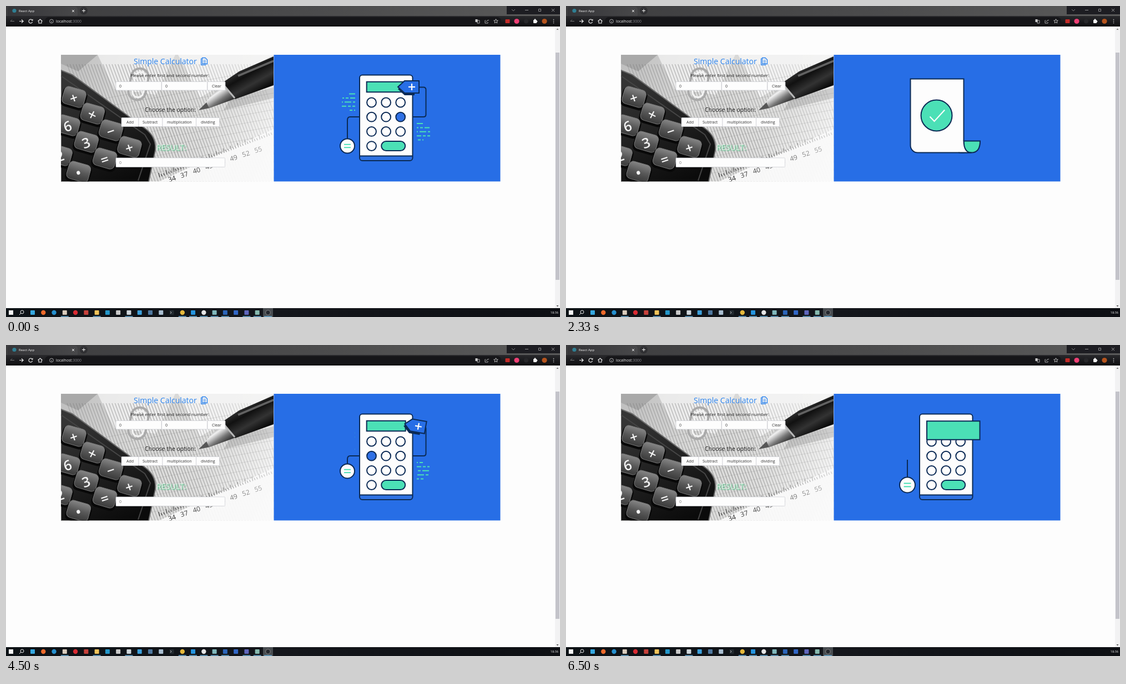
An HTML page with a canvas that plays this animation: 998 by 561 pixels, repeating every 6.57 s.

```html
<!DOCTYPE html>
<html lang="en">
<head>
<meta charset="utf-8">
<title>React App</title>
<style>
  html, body { margin: 0; width: 100%; height: 100%; overflow: hidden; background: #fdfdfd; }
  canvas { display: block; width: 998px; height: 561px; }
</style>
</head>
<body>
<canvas id="stage"></canvas>
<script>
const W = 998, H = 561, LOOP = 6570, CYCLE = 4970;
const NAVY = '#0b2a55', BLUE = '#276ee6', GREEN = '#4be0b6', WHITE = '#fdfdfd';
const dpr = window.devicePixelRatio || 1;
const stage = document.getElementById('stage');
const back = document.createElement('canvas');
for (const c of [stage, back]) { c.width = W * dpr; c.height = H * dpr; }
let g = back.getContext('2d');
g.scale(dpr, dpr);

// ---- helpers ----
function paint(fill, stroke, width = 2) {
  if (fill) { g.fillStyle = fill; g.fill(); }
  if (stroke) { g.strokeStyle = stroke; g.lineWidth = width; g.stroke(); }
}
function box(x, y, w, h, fill, stroke, r = 0, width = 2) {
  g.beginPath();
  g.roundRect(x, y, Math.max(0, w), Math.max(0, h), r);
  paint(fill, stroke, width);
}
function disc(x, y, r, fill, stroke, width) {
  if (r <= 0) return;
  g.beginPath();
  g.arc(x, y, r, 0, 7);
  paint(fill, stroke, width);
}
function poly(pts, fill, stroke, width, open) {
  g.beginPath();
  pts.forEach(([x, y], i) => i ? g.lineTo(x, y) : g.moveTo(x, y));
  if (!open) g.closePath();
  paint(fill, stroke, width);
}
const line = (pts, color, width) => poly(pts, null, color, width, true);
function text(s, x, y, size, color, weight = 400, align = 'left') {
  g.font = `${weight} ${size}px "Open Sans", "Noto Sans", sans-serif`;
  g.textAlign = align;
  g.textBaseline = 'alphabetic';
  g.fillStyle = color;
  g.fillText(s, x, y);
}
function at(x, y, angle, draw, scale = 1) {
  g.save();
  g.translate(x, y);
  g.rotate(angle);
  g.scale(scale, scale);
  draw();
  g.restore();
}
function ramp(x0, y0, x1, y1, ...colors) {
  const grad = g.createLinearGradient(x0, y0, x1, y1);
  colors.forEach((c, i) => grad.addColorStop(i / (colors.length - 1), c));
  return grad;
}

// ---- browser window ----
function drawBrowser() {
  box(0, 0, W, H, WHITE);
  box(0, 0, W, 18, ramp(0, 0, W, 0, '#3c3c3e', '#4a4a4b', '#5a5a5a'));
  box(3, 1, 126, 20, ramp(3, 0, 129, 0, '#353538', '#48484a'), null, 5);
  disc(15, 8.5, 3.6, '#2f7f93');
  text('React App', 23, 11, 6, '#f2f2f2', 500);
  line([[119, 7], [123, 11]], '#eee', 1);
  line([[123, 7], [119, 11]], '#eee', 1);
  disc(140, 8.5, 7, '#303033');
  line([[137, 8.5], [143, 8.5]], '#eee', 1);
  line([[140, 5.5], [140, 11.5]], '#eee', 1);
  box(902, 0, 96, 15, '#1d1d22');
  line([[911, 6], [914, 9], [917, 6]], '#999', 0.8);
  line([[935, 7.5], [941, 7.5]], '#aaa', 0.8);
  box(959.5, 5.5, 4, 4, null, '#aaa', 0, 0.8);
  line([[983, 5], [988, 10]], '#bbb', 0.8);
  line([[988, 5], [983, 10]], '#bbb', 0.8);

  box(0, 18, W, 19, ramp(0, 18, 0, 37, '#29292c', '#0d0d10'));
  box(70, 20, 822, 14, '#161619', null, 7);
  line([[15, 27.5], [8, 27.5], [11, 24.5]], '#777', 1);
  line([[24, 27.5], [31, 27.5], [28, 24.5]], '#eee', 1.1);
  line([[31, 27.5], [28, 30.5]], '#eee', 1.1);
  g.beginPath(); g.arc(44.5, 27.5, 3.4, 0.4, 5.6); paint(null, '#eee', 1.1);
  poly([[45.5, 26.5], [48.5, 26.5], [48.5, 23.5]], '#eee');
  line([[57.5, 27.5], [61.5, 24], [65.5, 27.5]], '#eee', 1.1);
  line([[59, 27], [59, 31], [64, 31], [64, 27]], '#eee', 1.1);
  disc(82, 27.5, 3.4, null, '#ccc', 0.8);
  line([[82, 27], [82, 29.5]], '#ccc', 0.8);
  text('localhost', 90, 30, 6.8, '#eee');
  const hostWidth = g.measureText('localhost').width;
  text(':3000', 90 + hostWidth, 30, 6.8, '#8c8c90');

  box(845.5, 24, 4, 5, '#ccc');
  box(849, 26, 4, 5, null, '#ccc', 0, 0.8);
  line([[864, 26], [863, 26], [863, 31], [868, 31], [868, 29]], '#ccc', 0.8);
  line([[865, 29], [867, 26], [870, 25.5]], '#ccc', 0.8);
  const star = [];
  for (let i = 0; i < 10; i++) {
    const a = -Math.PI / 2 + i * Math.PI / 5, r = i % 2 ? 1.8 : 4;
    star.push([882.5 + r * Math.cos(a), 27.5 + r * Math.sin(a)]);
  }
  poly(star, null, '#ddd', 0.8);
  box(899.5, 24, 8, 7, '#c22a28', null, 1);
  disc(920, 27.5, 4.6, '#ee3f74');
  disc(937, 27.5, 4, '#27272a');
  box(950, 25, 6, 6, '#f2f2f2', null, 1);
  disc(953, 24.7, 1.4, '#f2f2f2');
  disc(956, 28, 1.4, '#f2f2f2');
  disc(970, 27.5, 4.6, '#b5541d');
  for (const y of [24.5, 27.5, 30.5]) disc(986.5, y, 0.8, '#ddd');

  box(989, 37, 9, 508, '#f2f2f3');
  box(990, 84, 7, 410, '#c3c3ca');
  poly([[991.5, 43], [995.5, 43], [993.5, 40.5]], '#777');
  poly([[991.5, 540], [995.5, 540], [993.5, 542.5]], '#555');
}

function drawTaskbar() {
  box(0, 545, W, 16, ramp(0, 545, W, 545, '#0d1216', '#14161b', '#0d0f13'));
  box(463, 545, 18, 16, '#484c50');
  box(5, 549, 8, 8, '#f4f4f4');
  disc(29, 552, 3, null, '#eee', 1);
  line([[27, 554], [24, 557]], '#eee', 1);
  const icons = ['#35a7df', '#ed6a2b', '#2690cf', '#d8cbbc', '#d92b33', '#c6413b', '#f0c35a',
    '#2396c9', '#c8c8c8', '#ced5da', '#3c9fda', '#4f789f', '#a9bed0', '#232a30', '#e5b83b',
    '#2795df', '#e6e6e6', '#80b7bb', '#2c65b9', '#3267c5', '#6067bd', '#86b9ae', '#24272d'];
  icons.forEach((color, i) => {
    const x = 48 + i * 19.27;
    if ([1, 2, 4, 14, 16, 22].includes(i)) disc(x, 553, 4.2, color, i === 22 ? '#999' : null, 0.8);
    else box(x - 4, 549, 8, 8, color, null, 1);
    if ([3, 6, 9, 14, 15, 16, 17, 18, 20, 21, 22].includes(i)) box(x - 7, 559.4, 14, 1.4, '#6cb2dc');
  });
  line([[296, 551], [298, 553], [296, 555]], '#ddd', 0.8);
  text('18:36', 995, 555.2, 5.6, '#eee', 400, 'right');
}

// ---- desk picture behind the form ----
function drawDesk() {
  g.save();
  g.beginPath();
  g.rect(99, 88, 383.5, 228.5);
  g.clip();
  box(99, 88, 384, 229, ramp(99, 88, 482, 316, '#bdbdbd', '#d8d8d7', '#dededd', '#ffffff'));
  poly([[99, 88], [165, 88], [130, 118], [99, 104]], '#a9a9a9');
  poly([[165, 88], [305, 88], [270, 160], [195, 150]], 'rgba(245,245,245,.75)');
  poly([[310, 88], [482, 88], [410, 130], [350, 165]], 'rgba(250,250,250,.75)');

  for (let i = 0; i < 64; i++) {
    const x = 110 + i * 5.4;
    line([[x, 105], [x + 78, 317]], `rgba(70,70,70,${0.42 - Math.abs(i - 26) * 0.008})`, 1.2);
  }
  for (let i = 0; i < 11; i++)
    line([[160, 170 + i * 15], [482, 112 + i * 15]], 'rgba(105,105,105,.17)', 1);

  // scale sheet with its numbers
  poly([[275, 317], [372, 272], [482, 222], [482, 317]], 'rgba(250,250,250,.94)');
  for (let i = 0; i < 48; i++) {
    const x = 277 + i * 4.3, y = 309 - i * 1.63;
    line([[x, y], [x - 2, y - (i % 3 ? 4 : 8)]], `rgba(45,45,45,${0.8 - i * 0.013})`, 1.3);
  }
  for (let i = 0; i < 8; i++)
    at(299 + i * 22.2, 312 - i * 7.5, -0.3, () =>
      text(34 + i * 3, 0, 4, 12, `rgba(30,30,30,${0.95 - i * 0.075})`, 400, 'center'));

  // paper clip
  at(241, 142, 0.2, () => {
    box(-18, -29, 31, 57, null, '#aaa', 15, 4);
    box(-11, -23, 20, 46, null, '#f3f3f3', 10, 3);
  });

  // pen
  poly([[405, 166], [482, 147], [482, 166], [392, 188]], 'rgba(90,90,90,.22)');
  poly([[347, 188], [371, 161], [393, 137], [416, 166], [367, 184]],
    ramp(374, 145, 397, 178, '#444', '#f2f2f2', '#777', '#252525'));
  poly([[347, 188], [361, 174], [366, 184]], '#565656');
  poly([[389, 139], [420, 118], [482, 91], [482, 143], [413, 168]],
    ramp(420, 112, 447, 160, '#353535', '#111', '#333', '#090909'));
  line([[390, 140], [412, 166]], '#b9b9b9', 3);
  line([[418, 126], [482, 99]], '#626262', 4);

  // keypad
  g.beginPath();
  g.moveTo(99, 116);
  g.lineTo(119, 124);
  g.lineTo(252, 222);
  g.quadraticCurveTo(271, 237, 269, 260);
  g.lineTo(257, 317);
  g.lineTo(99, 317);
  g.closePath();
  paint(ramp(130, 130, 215, 316, '#353535', '#202020', '#0b0b0b'), '#696969', 2);
  line([[99, 126], [250, 232], [260, 249], [238, 315]], '#454545', 2);
  const rows = [[122, 166, ['+', '×', '−', '+']], [111, 217, ['6', '3', '=']], [97, 271, ['2', '•']]];
  for (const [x, y, keys] of rows) keys.forEach((key, i) =>
    at(x + i * 33.3, y + i * 30, 0.28, () => {
      box(-22, -17, 45, 36, '#080808', null, 9);
      box(-20, -18, 40, 32, ramp(0, -18, 0, 15, '#858585', '#575757', '#393939'), '#777', 8, 1);
      g.rotate(-0.6);
      text(key, 0, 9, 25, '#f4f4f4', 600, 'center');
    }));
  g.restore();
}

// ---- form ----
function field(x, y, w, h, label, tx, color = '#333') {
  box(x, y, w, h, WHITE, '#c9cbd0', 1, 0.7);
  text(label, tx, y + h / 2 + 2.6, 7, color);
}
function drawForm() {
  text('Simple Calculator', 230, 105, 14, '#2b83ee', 500);
  line([[353, 95], [351.5, 95], [351.5, 106.5], [360, 106.5]], '#2b83ee', 1.2);
  poly([[353.5, 93.5], [359, 93.5], [362.5, 97], [362.5, 104.5], [353.5, 104.5]], null, '#2b83ee', 1.3);
  for (const y of [98, 100.5, 103]) line([[355.5, y], [360, y]], '#2b83ee', 1);
  text('Please enter first and second number:', 224, 128, 8, '#222', 500);
  field(198, 136.5, 82, 15.5, '0', 204);
  field(280.5, 136.5, 82, 15.5, '0', 287);
  field(363, 136.5, 32, 15.5, 'Clear', 371);
  text('Choose the option:', 250, 191, 10.4, '#1f1f1f', 500);
  field(208, 201.5, 31, 16, 'Add', 217);
  field(239, 201.5, 43, 16, 'Subtract', 246);
  field(282, 201.5, 60.5, 16, 'multiplication', 290);
  field(342.5, 201.5, 42, 16, 'dividing', 351);
  g.save();
  g.shadowColor = '#26b36b';
  g.shadowBlur = 2 * dpr;
  g.shadowOffsetX = g.shadowOffsetY = dpr;
  text('RESULT:', 271, 260, 14.2, '#e4f5e9');
  g.restore();
  field(198, 274, 196.5, 16.5, '0', 204, '#777');
}

// ---- animated illustration ----
let p = 0;
const mix = (a, b, k) => a + (b - a) * k;
const span = (a, b) => Math.min(1, Math.max(0, (p - a) / (b - a)));
const easeOut = k => 1 - (1 - k) ** 2;
const smooth = k => k * k * (3 - 2 * k);
const run = (a, b) => smooth(span(a, b));
// Present between its entry late in the cycle and its exit in the next one.
const shown = (inA, inB, outA, outB) => p < 3000 ? 1 - run(outA, outB) : run(inA, inB);

function trimmed(draw, length, k, tail) {
  if (k <= 0) return;
  g.save();
  if (k < 1) {
    g.setLineDash([length * k, length * 2]);
    if (tail) g.lineDashOffset = -length * (1 - k);
  }
  g.beginPath();
  draw();
  paint(null, NAVY, 2);
  g.restore();
}

function dashes(x, y, k, dir) {
  if (k <= 0) return;
  g.save();
  g.beginPath();
  g.rect(dir < 0 ? x + 24 * (1 - k) : x, y - 2, 24 * k, 34);
  g.clip();
  const insets = [[13, 24], [1, 24], [0, 24], [0, 24], [12, 24]];
  insets.forEach(([a, b], i) => {
    g.setLineDash([12, 3, 5, 3]);
    g.lineDashOffset = i * 9 + p * 0.004;
    const from = dir < 0 ? x + a : x + 24 - b, to = dir < 0 ? x + b : x + 24 - a;
    line([[from, y + i * 7.4], [to, y + i * 7.4]], GREEN, 2);
  });
  g.restore();
}

function equalsBall() {
  const r = p < 3000
    ? 13 + Math.sin(Math.PI * span(1450, 1610)) - 13 * span(1615, 1770)
    : 13 * run(4250, 4420);
  if (r <= 0) return;
  const y = p < 3000 ? 252.5 : mix(202, 252.5, run(4290, 4710));
  disc(615, y, r, WHITE, NAVY, 2);
  const w = r * 0.46;
  for (const d of [-0.21, 0.21]) line([[615 - w, y + r * d], [615 + w, y + r * d]], GREEN, r * 0.15);
}

function tag() {
  const k = shown(4270, 4660, 1230, 1410);
  if (k <= 0) return;
  const late = p > 3000;
  const x = late ? mix(760, 727, k) : 727, tilt = late ? 0.48 * (1 - k) : 0;
  const shape = [[-21, 0], [-9, -11], [17, -11], [17, 11], [-9, 11]];
  at(x, 146, tilt, () => {
    const drop = late ? mix(-4, 0, k) : 0;
    poly(shape.map(([a, b]) => [a + drop, b + 4]).map(([a, b]) => [Math.min(a, 9), b]), NAVY);
    poly(shape, BLUE, NAVY, 2);
    line([[-2, 0], [10, 0]], WHITE, 2.2);
    line([[4, -6], [4, 6]], WHITE, 2.2);
  }, late ? Math.min(1, k * 3) : k);
}

function pressed(i) {
  if (p < 3000) return i === 5 && p < 180;
  return i === 3 ? p > 4400 && p < 4620 : i === 4 ? p > 4620 && p < 4830 : i === 5 && p > 4830;
}

function calculator() {
  const late = p > 3000;
  if (late ? p < 3500 : p > 1860) return;
  const grow = late ? run(3500, 3850) : 1;
  const settle = late ? run(4070, 4260) : 1;
  const size = late ? 1 : 1 - run(1640, 1860);
  at(685, 202, 0, () => {
    g.translate(-685, -202);
    const l = mix(mix(620, 631.5, grow), 637, settle);
    const r = mix(mix(716, 738, grow), 732.5, settle);
    const t = mix(mix(131, 119.5, grow), 124.5, settle);
    const b = mix(mix(265, 279.5, grow), 279, settle);
    box(l, t, r - l, b - t, WHITE, null, 5);
    const base = late ? mix(12.5, 8.5, settle) * run(3680, 3850) : 8.5;
    if (base > 0.5) {
      box(l, b - base, r - l, base, '#2f72e2', null, [0, 0, 5, 5]);
      line([[l, b - base], [r, b - base]], NAVY, 2);
    }
    box(l, t, r - l, b - t, null, NAVY, 5);

    const open = late ? run(3760, 3960) : 1;
    if (open > 0 && (late || p < 1400)) {
      const w = mix(87, 70, settle) * open, h = mix(26.5, 18.5, settle) * open;
      box(684.7 - w / 2, mix(144.7, 146, settle) - h / 2, w, h, GREEN, NAVY);
    }
    for (let i = 0; i < 10; i++) {
      const start = 3830 + i * 30;
      const k = late ? easeOut(span(start, start + 185)) : 1;
      disc(658.5 + (i % 3) * 26.1, 174 + Math.floor(i / 3) * 26.2, 8.4 * k,
        pressed(i) ? '#2f70e4' : WHITE, NAVY, 2);
    }
    const pill = mix(59, 43, settle) * (late ? run(3820, 3990) : 1);
    if (pill > 2) box(mix(700, 697.7, settle) - pill / 2, 244, pill, 17, GREEN, NAVY, Math.min(8.5, pill / 2));
  }, size);
}

function receipt() {
  if (p < 1400 || p >= 3500) return;
  const widen = run(1400, 1530), drop = span(1530, 1630), move = run(1630, 1940);
  const l = mix(650, 620.5, move), w = mix(mix(70, 95.5, widen), 96, move);
  const t = mix(mix(137, 151, drop), 131.5, move);
  const b = mix(mix(mix(155, 170, widen), 240, drop), 264.5, move);
  const tint = run(1700, 1910);
  const color = `rgb(${mix(75, 253, tint)},${mix(224, 253, tint)},${mix(182, 253, tint)})`;
  const roll = run(1880, 2080) * (1 - run(3300, 3480));
  const x = l + w, end = x + 29.5 * roll;
  if (roll > 0.02) {
    // curled end of the paper
    const r = 21 * Math.min(1, roll);
    g.beginPath();
    g.moveTo(x - 5, b - 21);
    g.lineTo(end, b - 21);
    g.quadraticCurveTo(end, b, Math.max(x, end - r * 0.75), b);
    g.lineTo(x - 5, b);
    g.closePath();
    paint(GREEN, NAVY, 2);
  }
  box(l, t, w, b - t, color, NAVY, [0, 0, 0, 13 * roll]);
  if (roll > 0.02) {
    g.beginPath();
    g.moveTo(x, b - 21);
    g.quadraticCurveTo(x, b, x + 14 * roll, b);
    g.lineTo(x - 8, b);
    g.lineTo(x - 8, b - 21);
    paint(WHITE);
    g.beginPath();
    g.moveTo(x, b - 22);
    g.quadraticCurveTo(x, b, x + 14 * roll, b);
    g.lineTo(x - 9, b);
    paint(null, NAVY, 2);
  }
  const badge = run(2010, 2210) * (1 - run(3240, 3420));
  disc(667.5, 197.5, 28 * badge, GREEN, NAVY, 2);
  const tick = span(2150, 2340);
  if (tick > 0 && badge > 0) at(667.5, 197.5, 0, () => {
    const a = Math.min(1, tick / 0.3), c = Math.max(0, (tick - 0.3) / 0.7);
    const pts = [[-12, 2], [-12 + 8 * a, 2 + 8.5 * a]];
    if (c > 0) pts.push([-4 + 20 * c, 10.5 - 22 * c]);
    line(pts, WHITE, 2.2);
  }, badge);
}

function illustration() {
  box(482.5, 88, 408, 228.5, BLUE);
  dashes(605, 158.5, shown(4490, 4690, 1100, 1370), -1);
  dashes(740, 212, shown(4290, 4470, 1100, 1370), 1);
  trimmed(() => {
    g.moveTo(733, 200);
    g.lineTo(752, 200);
    g.quadraticCurveTo(756.5, 200, 756.5, 196);
    g.lineTo(756.5, 151);
    g.quadraticCurveTo(756.5, 146.5, 752, 146.5);
    g.lineTo(742, 146.5);
  }, 86, shown(4230, 4470, 1320, 1510));
  const travel = p > 3000 ? run(4290, 4710) : 1 - span(1400, 1610);
  trimmed(() => {
    g.moveTo(637, 200);
    g.lineTo(620, 200);
    g.quadraticCurveTo(615, 200, 615, 206);
    g.lineTo(615, 240);
  }, 60, p > 3000 ? Math.min(1, 0.42 * run(4230, 4310) + 0.6 * travel) : mix(0, 1, travel) + 0.18 * (travel > 0 && travel < 1), p < 3000);
  equalsBall();
  calculator();
  tag();
  receipt();
}

drawBrowser();
drawTaskbar();
drawDesk();
drawForm();

g = stage.getContext('2d');
g.scale(dpr, dpr);
const begin = performance.now();
function frame() {
  p = ((performance.now() - begin) % LOOP) % CYCLE;
  g.drawImage(back, 0, 0, W, H);
  illustration();
  requestAnimationFrame(frame);
}
frame();
</script>
</body>
</html>
```
